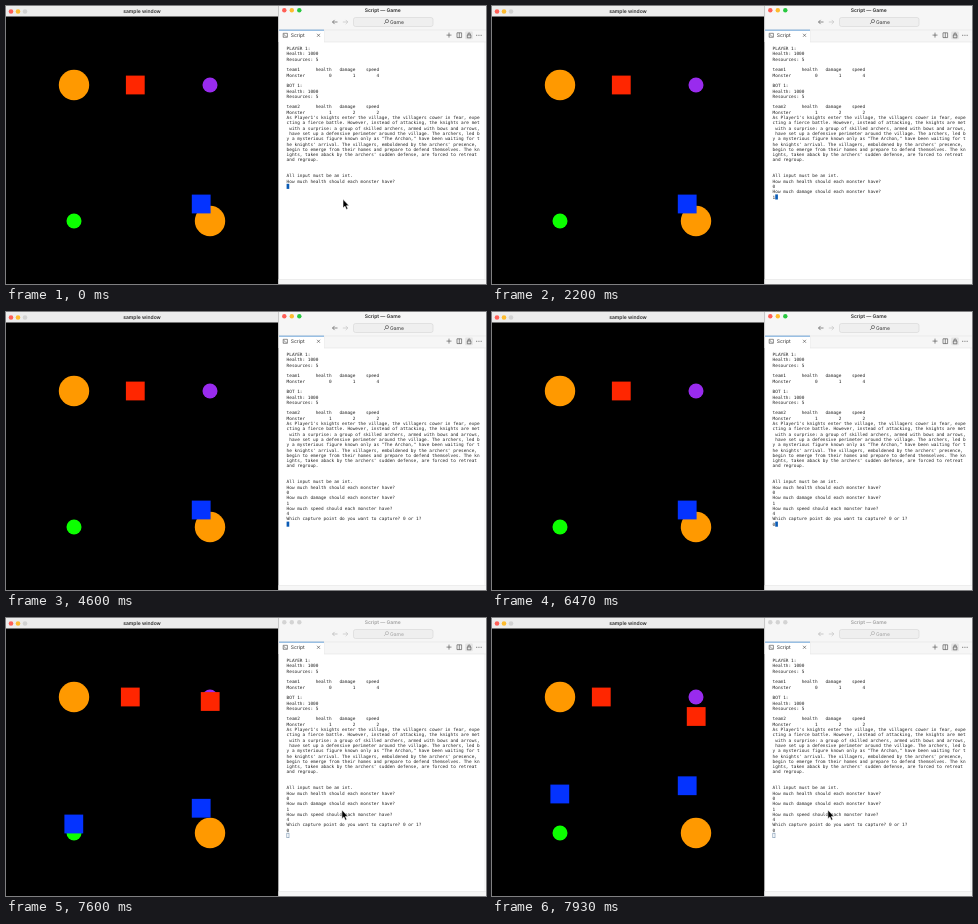
An HTML page for the animation above (8 s loop, 480x278 px).

```html
<!DOCTYPE html>
<html lang="en">
<head>
<meta charset="utf-8">
<title>Game</title>
<style>
html, body { margin: 0; width: 100%; height: 100%; overflow: hidden; background: #000; }
svg { display: block; width: 100vw; height: 100vh; }
text { font-family: Inter, Roboto, sans-serif; font-size: 5px; fill: #333; text-rendering: geometricPrecision; }
.title { font-weight: 600; fill: #2b2b2b; text-anchor: middle; }
#term text { font: 4.4px "DejaVu Sans Mono", "Liberation Mono", monospace; fill: #222; white-space: pre; }
.icon { fill: none; stroke: #444; stroke-width: .6; }
.idle .title, .idle .fade { fill: #a0a0a0; }
.idle .light { fill: #d4d4d4; }
.idle .nav { stroke: #aaa; }
</style>
</head>
<body>
<svg viewBox="0 0 480 278" preserveAspectRatio="none">
  <rect width="480" height="278"/>

  <rect width="272" height="10.5" fill="#ececec"/>
  <circle cx="5" cy="5.5" r="2.3" fill="#ff5f57"/>
  <circle cx="12" cy="5.5" r="2.3" fill="#febc2e"/>
  <circle cx="19" cy="5.5" r="2.3" fill="#d2d2d2"/>
  <text class="title" x="136" y="7.3">sample window</text>

  <circle cx="68" cy="79" r="15.2" fill="#ff9900"/>
  <circle cx="204" cy="215" r="15.2" fill="#ff9900"/>
  <circle cx="204" cy="79" r="7.5" fill="#992bee"/>
  <circle cx="68" cy="215" r="7.5" fill="#0cff00"/>
  <g id="units"></g>

  <g id="editor">
    <rect x="272.5" width="207.5" height="278" fill="#fff"/>
    <rect x="272.5" width="207.5" height="36" fill="#f6f6f6"/>
    <path d="M272.5 24H480M318 36H480M318 24V36" fill="none" stroke="#e2e2e2" stroke-width=".6"/>
    <rect x="273" y="24" width="45" height="12.5" fill="#fff"/>
    <rect x="273" y="23.8" width="45" height=".6" fill="#005fb8"/>
    <rect x="272.5" y="273.5" width="207.5" height="4.5" fill="#f6f6f6"/>
    <path d="M272.5 273.5H480M272.7 0V278M479 36V273" stroke="#dedede" stroke-width=".5"/>

    <circle class="light" cx="278.3" cy="4.2" r="2.2" fill="#ff5f57"/>
    <circle class="light" cx="285.8" cy="4.2" r="2.2" fill="#febc2e"/>
    <circle class="light" cx="293.3" cy="4.2" r="2.2" fill="#28c840"/>
    <text class="title" x="376.7" y="6.1">Script — Game</text>

    <path class="icon nav" d="M331.5 16H326.5M328.6 13.9L326.5 16L328.6 18.1"/>
    <path class="icon" style="stroke:#bbb" d="M336.8 16H341.8M339.7 13.9L341.8 16L339.7 18.1"/>
    <rect x="347.5" y="11.5" width="79.5" height="9" rx="2" fill="#efefef" stroke="#cfcfcf" stroke-width=".5"/>
    <path class="icon nav" d="M378 18L379.7 16.2M382.6 15.1a1.6 1.6 0 1 1-3.2 0a1.6 1.6 0 1 1 3.2 0"/>
    <text class="fade" x="384" y="17.8">Game</text>

    <path class="icon" d="M277.2 27.3h4.2v4h-4.2zM278 28.3l1 1l-1 1M279.6 30.4h1"/>
    <text x="284.8" y="31.2">Script</text>
    <path class="icon" d="M311 27.8l3 3M314 27.8l-3 3"/>
    <rect x="459.2" y="25.6" width="7.6" height="7.6" rx="1" fill="#e4e4e4"/>
    <path class="icon" d="M443 26.6v5M440.5 29.1h5M451 26.8h4.6v4.8H451zM453.3 26.8v4.8M461.3 29h3.6v2.8h-3.6zM462 29v-1a1.1 1.1 0 0 1 2.2 0v1"/>
    <path d="M470.3 29.3h.9M472.5 29.3h.9M474.7 29.3h.9" stroke="#444" stroke-width=".9"/>
    <g id="term"></g>
    <rect id="caret"/>
  </g>
  <path id="mouse" d="M0 0V8.7L2 6.9L3.4 10.2L4.9 9.5L3.5 6.4H6.1Z" stroke="#fff" stroke-width=".6"/>
</svg>
<script>
const LOOP = 8000, LEFT = 280.6, TOP = 44.1, CHAR = 2.649, ROW = 5.3;
const $ = id => document.getElementById(id);

function add(parent, tag, attrs) {
  const el = document.createElementNS("http://www.w3.org/2000/svg", tag);
  for (const k in attrs) el.setAttribute(k, attrs[k]);
  return parent.appendChild(el);
}

const story = `PLAYER 1:
Health: 1000
Resources: 5

team1      health   damage    speed
Monster         0        1        4

BOT 1:
Health: 1000
Resources: 5

team2      health   damage    speed
Monster         1        2        2
As Player1's knights enter the village, the villagers cower in fear, expe
cting a fierce battle. However, instead of attacking, the knights are met
 with a surprise: a group of skilled archers, armed with bows and arrows,
 have set up a defensive perimeter around the village. The archers, led b
y a mysterious figure known only as "The Archon," have been waiting for t
he knights' arrival. The villagers, emboldened by the archers' presence,
begin to emerge from their homes and prepare to defend themselves. The kn
ights, taken aback by the archers' sudden defense, are forced to retreat
and regroup.


All input must be an int.
How much health should each monster have?`.split("\n");

// [time, row, text] for everything that shows up while playing
const typed = [
  [1000, 26, "0"],
  [1730, 27, "How much damage should each monster have?"],
  [2200, 28, "1"],
  [3000, 29, "How much speed should each monster have?"],
  [4330, 30, "4"],
  [4600, 31, "Which capture point do you want to capture? 0 or 1?"],
  [6470, 32, "0"]
];
// [time, row, column]
const carets = [
  [0, 26, 0], [1000, 26, 1], [1730, 28, 0], [2200, 28, 1], [3000, 30, 0],
  [4330, 30, 1], [4600, 32, 0], [6470, 32, 1], [7330, 33, 0]
];
// [time, x, y]; x < 0 hides the pointer
const pointer = [[0, 337, 193.3], [270, 336.3, 192.9], [930, -20, 0], [7460, 335.9, 192]];

const START = 7330, STEP = 200 / 3, FOCUS = 7460;
// x, y, direction, speed factor, colour, time of appearance
const units = [
  { x: 129.3, y: 79, dx: -1, dy: 0, v: 1, lead: .5, fill: "#ff2600", from: 0 },
  { x: 195.2, y: 198, dx: 0, dy: -1, v: 1.5, lead: 1, fill: "#0433ff", from: 0 },
  { x: 204.2, y: 79, dx: 0, dy: 1, v: 1, lead: 0, fill: "#ff2600", from: START },
  { x: 67.8, y: 215, dx: 0, dy: -1, v: 2, lead: 0, fill: "#0433ff", from: START }
];

function line(row, text) {
  const el = add($("term"), "text", { x: LEFT, y: TOP + row * ROW });
  el.textContent = text;
  return el;
}

story.forEach((text, row) => line(row, text));
const lines = typed.map(([at, row, text]) => ({ at, el: line(row, text) }));
for (const u of units) u.el = add($("units"), "rect", { width: 18.8, height: 18.8, fill: u.fill });

const current = (table, t) => table.filter(s => s[0] <= t).pop();
const show = (el, on) => el.setAttribute("visibility", on ? "visible" : "hidden");

function set(el, attrs) {
  for (const k in attrs) el.setAttribute(k, attrs[k]);
}

function draw(t) {
  const idle = t >= FOCUS;
  for (const l of lines) show(l.el, t >= l.at);

  const [, row, col] = current(carets, t);
  const inset = idle ? .25 : 0;
  set($("caret"), {
    x: LEFT + col * CHAR + inset, y: TOP + row * ROW - 4.1 + inset,
    width: CHAR - 2 * inset, height: 5.1 - 2 * inset,
    fill: idle ? "none" : "#0a5bb5", stroke: idle ? "#5d7f9f" : "none", "stroke-width": .5
  });

  const [, px, py] = current(pointer, t);
  set($("mouse"), { transform: `translate(${px} ${py})` });
  show($("mouse"), px > 0);
  $("editor").setAttribute("class", idle ? "idle" : "");

  // The game advances 3 px per tick after a short stall
  const tick = Math.floor((t - START + 5) / STEP);
  const dist = Math.max(0, 3 * (tick - 2.5));
  for (const u of units) {
    const d = t < START ? 0 : Math.max(u.lead, dist * u.v + u.lead);
    set(u.el, { x: u.x + u.dx * d - 9.4, y: u.y + u.dy * d - 9.4 });
    show(u.el, t >= u.from);
  }
}

const begin = performance.now();
function frame() {
  draw((performance.now() - begin) % LOOP);
  requestAnimationFrame(frame);
}
frame();
</script>
</body>
</html>
```
